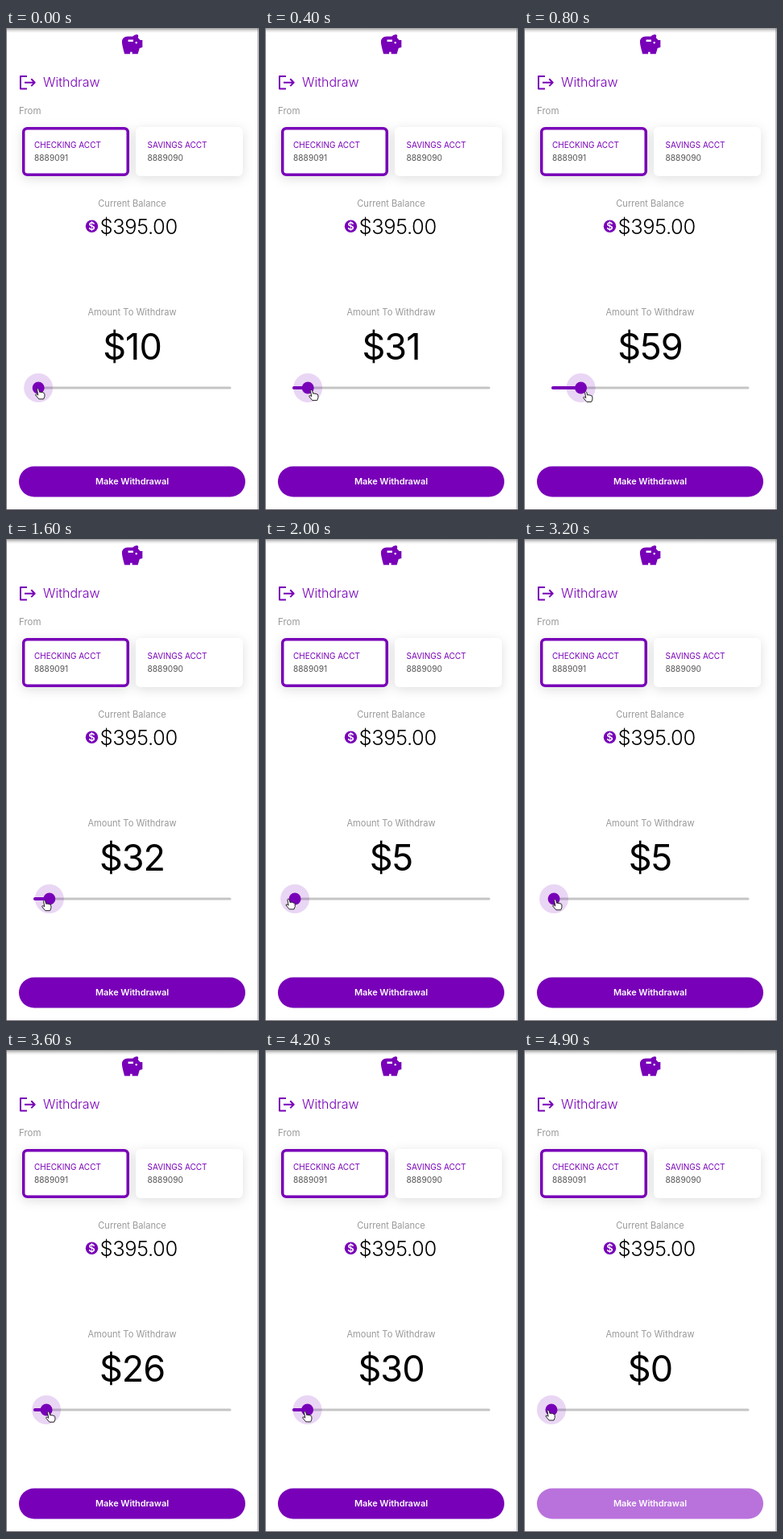
An HTML page that plays this animation: 314x600 px, repeating every 5000 ms.

```html
<!DOCTYPE html>
<html lang="en">
<head>
<meta charset="utf-8">
<title>Withdraw</title>
<style>
  html, body { margin: 0; width: 100%; height: 100%; overflow: hidden; background: #fff; }
  svg { display: block; width: 314px; height: 600px; font-family: Inter, "Open Sans", sans-serif; }
  .card { fill: #fff; filter: drop-shadow(0 3px 7px rgba(0, 0, 0, .13)); }
  .purple { fill: #7800b8; }
  .label { fill: #999; font-size: 11.1px; }
  .name { fill: #7800b8; font-size: 10px; }
  .number { fill: #555; font-size: 10.2px; }
  .mid { text-anchor: middle; }
  .line { fill: none; stroke: #7800b8; stroke-width: 2; stroke-linejoin: round; }
</style>
</head>
<body>
<svg viewBox="0 0 314 600">
  <defs>
    <linearGradient id="shade" x2="0" y2="1">
      <stop stop-color="#999"/>
      <stop offset=".5" stop-color="#ddd"/>
      <stop offset="1" stop-color="#fff"/>
    </linearGradient>
  </defs>
  <rect width="314" height="600" fill="#fff"/>
  <rect width="314" height="6" fill="url(#shade)"/>

  <!-- Piggy bank -->
  <path class="purple" fill-rule="evenodd" transform="translate(141.4 5.5) scale(1.27)"
    d="M19.8 7.5L17.6 5.2Q17.7 4.6 17.9 4.1A1.5 1.5 0 0 0 16.5 2Q14 2 12.5 4H7.5Q2 4.3 2 9.5C2 12.5 4.5 21 4.5 21H10V19H12V21H17.5L19.2 15.4L22 14.5V7.5ZM13 9H8V7H13ZM16 11a1 1 0 1 1 .01 0Z"/>

  <path class="line" d="M26 60H18V75.500H26M23 67.700H35.500M31.300 63.300L35.700 67.700L31.300 72.100"/>
  <text class="purple" x="46" y="73" font-size="16" font-weight="300">Withdraw</text>
  <text class="label" x="16" y="107" style="font-size:11.5px">From</text>

  <rect class="card" x="20" y="123" width="133" height="61" rx="6"/>
  <rect class="line" x="21.750" y="124.750" width="129.500" height="57.500" rx="4.500" style="stroke-width:3.5"/>
  <text class="name" x="35" y="149">CHECKING ACCT</text>
  <text class="number" x="35" y="165">8889091</text>
  <rect class="card" x="161" y="123" width="133" height="61" rx="6"/>
  <text class="name" x="175.500" y="149">SAVINGS ACCT</text>
  <text class="number" x="175.500" y="165">8889090</text>

  <text class="label mid" x="156.500" y="222">Current Balance</text>
  <circle class="purple" cx="106.500" cy="246.300" r="7.700"/>
  <text class="mid" x="106.500" y="251" font-size="13" font-weight="600" fill="#fff">$</text>
  <text x="116.500" y="255.500" font-size="25.500" font-weight="300" letter-spacing="-.4">$395.00</text>

  <text class="label mid" x="156.500" y="357">Amount To Withdraw</text>
  <text class="mid" id="amount" x="156.500" y="411.500" font-size="45" letter-spacing="-1"></text>

  <rect x="34" y="445.500" width="245.500" height="3" rx="1.500" fill="#c5c5c5"/>
  <rect class="purple" id="filled" x="34" y="445" height="4" rx="2"/>
  <g id="thumb">
    <circle class="purple" r="18" opacity=".16"/>
    <circle class="purple" r="7.500"/>
  </g>

  <rect id="button" x="16" y="544.500" width="281" height="38" rx="19"/>
  <text class="mid" x="156.500" y="567" font-size="11" font-weight="600" letter-spacing="-.1" fill="#fff">Make Withdrawal</text>

  <!-- Hand pointer -->
  <path id="hand" fill="#fff" stroke="#222" stroke-width="1" stroke-linejoin="round"
    d="M-3.500 -5.500Q-2.500 -7.500 -1.300 -5.500L-.2 -1.800Q1 -3 2 -1.700Q3.200 -2.600 4 -1.200Q5.400 -1.700 5.800 0L6 3L4.700 6.500H-1.200L-5.300 1.600Q-5.300 -.2 -3.400 .8L-2.200 1.700Z"/>

  <path d="M.5 0V600M313 0V600" stroke="#77757c" stroke-width="1"/>
  <rect y="598" width="314" height="2" fill="#4b4852"/>
</svg>
<script>
  const LOOP = 5000, STEP = 100, MAX = 395;
  // [time, amount]
  const amounts = [[0, 10], [400, 31], [800, 59], [1100, 71], [1300, 61], [1600, 32], [1800, 16],
    [2100, 0], [2700, 0], [3100, 0], [3200, 5], [3600, 26], [3900, 34], [4200, 30], [4400, 19],
    [4700, 0], [5000, 0]];
  // [time, pointer x]
  const pointer = [[0, 42], [400, 60], [800, 79], [1100, 84], [1300, 74], [1600, 50], [1800, 38],
    [2100, 28], [2700, 27], [3200, 41], [3600, 55], [3900, 59], [4200, 52], [4400, 44],
    [4700, 33], [5000, 32]];
  const get = id => document.getElementById(id);

  function at(keys, t) {
    const i = keys.findIndex(k => k[0] > t);
    const [t0, a] = keys[i - 1], [t1, b] = keys[i];
    return a + (b - a) * (t - t0) / (t1 - t0);
  }

  function draw(now) {
    const t = Math.floor(now % LOOP / STEP) * STEP;
    const amount = Math.round(at(amounts, t));
    const length = 245 * amount / MAX;
    const px = at(pointer, t);
    const py = 453 + Math.max(0, px - 27) * .095;
    get("amount").textContent = "$" + amount;
    get("filled").setAttribute("width", length);
    get("thumb").setAttribute("transform", `translate(${34 + length} 447)`);
    get("hand").setAttribute("transform", `translate(${px} ${py})`);
    get("button").setAttribute("fill", amount ? "#7800b8" : "#b972dc");
    requestAnimationFrame(() => draw(performance.now()));
  }
  draw(0);
</script>
</body>
</html>
```
